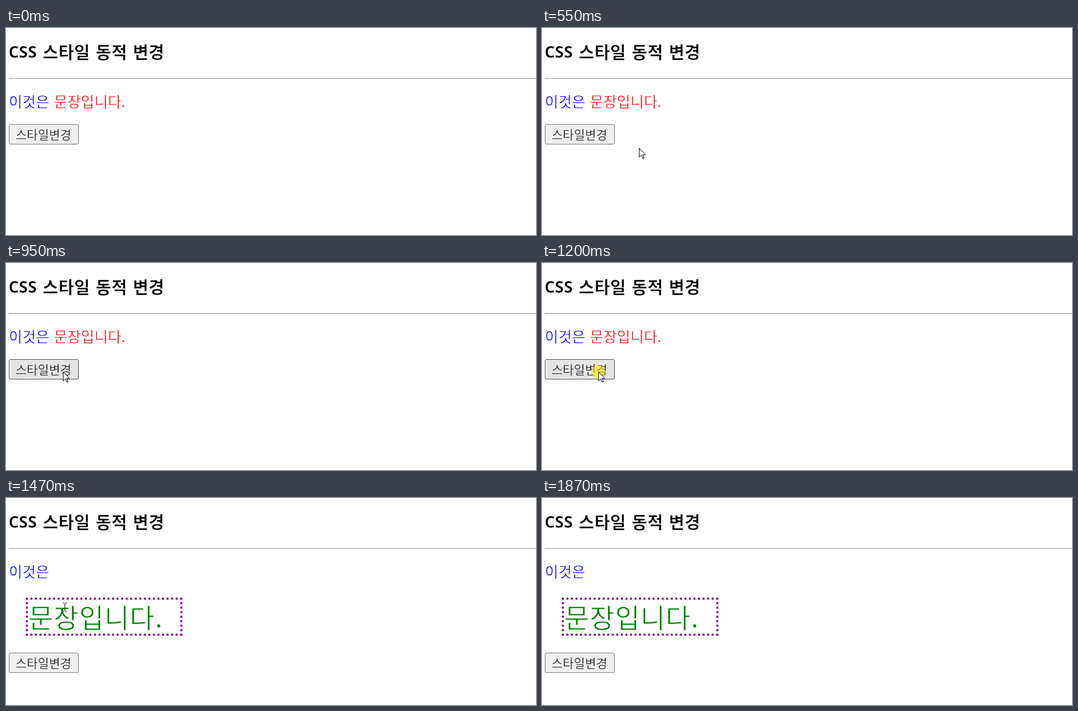
Recreate the animation shown at these times as an HTML page. Size 940 by 368 pixels, loop 2.66 s.

```html
<!DOCTYPE html>
<html lang="ko">
<head>
<meta charset="utf-8">
<title>CSS 스타일 동적 변경</title>
<style>
html, body { margin: 0; width: 100%; height: 100%; overflow: hidden; background: #fff; }
svg { position: absolute; left: 0; top: 0; }
/* A thin stroke in the background colour lightens the letters. */
text { font: 350 26px "Noto Sans CJK KR", "Noto Sans KR", sans-serif; stroke: #fff; stroke-width: .5px; }
.title text { font-size: 30px; font-weight: 700; letter-spacing: .4px; }
.title .latin { font: 700 28.8px "Open Sans", sans-serif; letter-spacing: 0; }
#phrase.big { font-size: 48px; letter-spacing: .8px; stroke-width: 1px; }
#button { --face: #efefef; --edge: #767676; }
#button.hover { --face: #e5e5e5; --edge: #4f4f4f; }
#button rect { fill: var(--face); stroke: var(--edge); }
#button text { font-size: 21.5px; stroke: var(--face); }
#box { position: absolute; left: 35px; top: 177px; width: 278px; height: 68px;
  box-sizing: border-box; border: 4px dotted purple; }
</style>
</head>
<body>
<div id="box"></div>
<svg width="940" height="368" viewBox="0 0 940 368">
  <g class="title">
    <text class="latin" x="4.5" y="53">CSS</text>
    <text x="65" y="54">스타일</text>
    <text x="159" y="54">동적</text>
    <text x="225" y="54">변경</text>
  </g>
  <path d="M5 89.5H940" stroke="#9a9a9a"/>
  <path d="M5 90.5H940" stroke="#eee"/>
  <text x="5" y="141" fill="#00f">이것은</text>
  <text id="phrase">문장입니다.</text>
  <g id="button">
    <rect x="5.5" y="171.5" width="123" height="35" rx="2.5"/>
    <text x="17" y="198">스타일변경</text>
  </g>
  <circle id="click" cx="100" cy="193" r="12" fill="#fbf000" fill-opacity=".58"/>
  <path id="arrow" d="M.5.5v16l3.7-3.5 2.6 6 2.3-1-2.6-5.8h5z" fill="#fff" stroke="#000"/>
  <path id="beam" d="M-3-7.5h2.5M1.5-7.5H4M.5-7V7M-3 7.5h2.5M1.5 7.5H4" fill="none" stroke="#000"/>
</svg>
<script>
const LOOP = 2660, FPS = 15;
// Events, counted in steps of 1 / FPS second
const ENTER = 3, HOVER = 11, REST = 15, CLICK = 18, RESTYLE = 19, RELEASE = 20,
  MOVE = 22, LEAVE_BOX = 24, EXIT = 28;
const $ = id => document.getElementById(id);

const linear = p => p;
const easeIn = p => p * p;
const easeOut = p => 1 - (1 - p) ** 2;

// Pointer path: step, x, y, easing towards the next point
const path = [
  [ENTER, 780, 354, linear],
  [5, 331, 256, easeOut],
  [HOVER, 119, 198, easeOut],
  [REST, 100, 193, linear],
  [CLICK, 100, 193, linear],
  [RESTYLE, 102, 194, linear],
  [MOVE, 104, 194, easeIn],
  [25, 832, 320, easeOut],
  [EXIT, 918, 372]
];

function pointerAt(step) {
  const next = path.findIndex(point => point[0] > step);
  const [start, x, y, ease] = path[next - 1];
  const [end, nextX, nextY] = path[next];
  const p = ease((step - start) / (end - start));
  return [x + (nextX - x) * p, y + (nextY - y) * p].map(Math.round);
}

const show = (id, on) => $(id).style.display = on ? "" : "none";

function setAttrs(id, attrs) {
  for (const name in attrs) $(id).setAttribute(name, attrs[name]);
}

function draw(step) {
  const changed = step >= RESTYLE;
  const visible = step >= ENTER && step < EXIT;
  const overText = changed && step < LEAVE_BOX;

  show("box", changed);
  show("click", step >= CLICK && step < RELEASE);
  setAttrs("phrase", changed
    ? { class: "big", x: 39.5, y: 231, fill: "green" }
    : { class: "", x: 85, y: 141, fill: "red" });
  setAttrs("button", {
    class: step >= HOVER && !changed ? "hover" : "",
    transform: `translate(0 ${changed ? 104 : 0})`
  });

  show("arrow", visible && !overText);
  show("beam", visible && overText);
  if (visible) {
    setAttrs(overText ? "beam" : "arrow", { transform: `translate(${pointerAt(step)})` });
  }
}

const start = performance.now();
function tick() {
  const t = (performance.now() - start) % LOOP;
  draw(Math.floor(t * FPS / 1000));
  requestAnimationFrame(tick);
}
tick();
</script>
</body>
</html>
```
